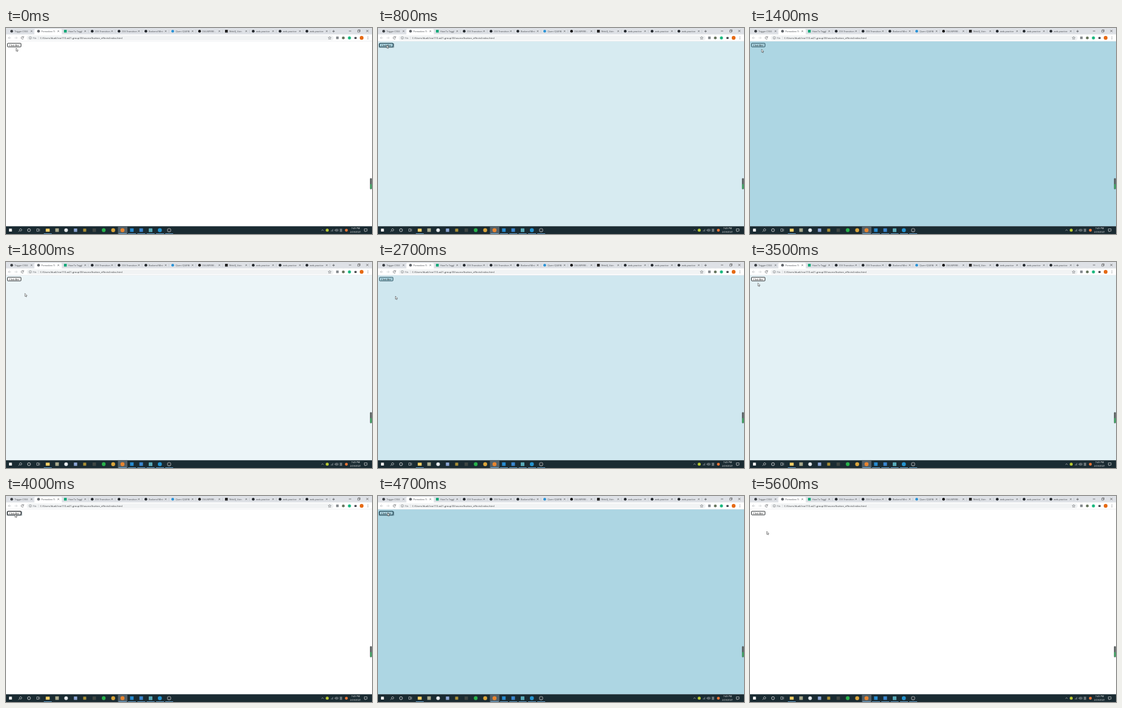
Recreate the animation shown at these times as an HTML page. Size 600x338 px, loop 5800 ms.

```html
<!DOCTYPE html>
<html lang="en">
<head>
<meta charset="utf-8">
<title>Button effects</title>
<style>
html, body { margin: 0; width: 100%; height: 100%; overflow: hidden; background: #fff; }
svg { display: block; width: 600px; height: 338px; }
text { font: 3.75px "Open Sans", "Noto Sans", sans-serif; fill: #45494d; }
</style>
</head>
<body>
<svg id="stage" viewBox="0 0 600 338"></svg>
<script>
const stage = document.getElementById('stage');

function add(tag, attrs, content) {
  const el = document.createElementNS('http://www.w3.org/2000/svg', tag);
  for (const key in attrs) el.setAttribute(key, attrs[key]);
  if (content) el.textContent = content;
  return stage.appendChild(el);
}
const rect = (x, y, width, height, fill, rx = 0) => add('rect', { x, y, width, height, fill, rx });
const dot = (cx, cy, r, fill) => add('circle', { cx, cy, r, fill });
const square = (x, y, size, fill) => rect(x - size / 2, y - size / 2, size, size, fill, 0.5);
const line = (d, stroke, width = 0.7) => add('path', { d, stroke, 'stroke-width': width, fill: 'none' });
const label = (x, y, content, style = '') => add('text', { x, y, style }, content);

const page = rect(0, 22, 600, 303.5, '#fff');

function drawTabs() {
  rect(0, 0, 600, 11, '#dee1e6');
  rect(46.5, 1.5, 45, 10, '#fff', 1.6);
  const tabs = [
    ['Trigger CSS3', '#3c4045'], ['Pomodoro Ti', '#5f6368'], ['How To Toggl', '#16a878'],
    ['CSS Transition', '#24292e'], ['CSS Transition', '#24292e'], ['Backend Mini', '#24292e'],
    ['Quen (QUEN)', '#2b93d6'], ['DULMFERE -', '#111'], ['Web3J, Usin', '#222'],
    ['web-practice', '#24292e'], ['web-practice', '#24292e'], ['web-practice', '#24292e']
  ];
  tabs.forEach(([title, color], i) => {
    const x = 9.3 + i * 44;
    if (i === 2 || i === 8) square(x, 5.3, 4.6, color);
    else dot(x, 5.3, 2.3, color);
    label(x + 4.7, 6.7, title);
    line(`M${x + 31.2} 4l2.6 2.6m0 -2.6l-2.6 2.6`, '#4a4d51', 0.6);
    if (i > 1) line(`M${x + 37.7} 3v5`, '#a7abb0', 0.4);
  });
  line('M535 5.4h4M537 3.4v4', '#45494d');
  line('M562 5h4M590.7 3.2l3.4 3.4m0 -3.4l-3.4 3.4', '#333', 0.6);
  line('M576.6 3.8h3v3h-3zM577.5 3.8v-.9h3v3h-.9', '#333', 0.5);
}

function drawToolbar() {
  rect(0, 10.5, 600, 11.2, '#fff');
  rect(0, 21.5, 600, 0.5, '#dfe1e4');
  rect(34, 12.3, 503, 7.8, '#f1f3f4', 3.9);
  line('M8.2 16.2h-4.4m2 -2l-2 2l2 2', '#b5b8bb');
  line('M14 16.2h4.4m-2 -2l2 2l-2 2', '#c8cacc');
  line('M28.6 15a2 2 0 1 0 .2 2M29 13.7v1.7h-1.8', '#4f5357');
  line('M37.8 16.2a2 2 0 1 0 4 0a2 2 0 1 0 -4 0M39.8 16v1.3', '#55595d', 0.5);
  label(44, 17.7, 'File', 'fill:#5f6368');
  line('M53.2 14v4.4', '#b8bbbf', 0.4);
  label(56, 17.8, 'C:/Users/duoli/cse110-w21-group33/source/button_effects/index.html',
    'font-size:4.15px;fill:#303336');
  line('M530.6 13.9l.7 1.5l1.7.2l-1.2 1.2l.3 1.7l-1.5-.8l-1.5.8l.3-1.7l-1.2-1.2l1.7-.2z', '#4f5357', 0.5);
  square(543.3, 16.2, 4.2, '#858a8e');
  dot(553, 16.2, 2.3, '#65745c');
  dot(563, 16.2, 2.5, '#18b87e');
  square(573, 16.4, 3.4, '#44484c');
  dot(583, 16.2, 3.1, '#e66a14');
  for (const y of [14.3, 16.2, 18.1]) dot(593.2, y, 0.5, '#55595d');
}

function drawTaskbar() {
  rect(0, 325.3, 600, 12.7, '#1a2b32');
  rect(183.5, 325.3, 15.5, 12.7, '#526068');
  square(7.3, 331.7, 4.8, '#f4f4f4');
  line('M20.5 334.3l2 -2a1.8 1.8 0 1 1 .4 .4', '#eee');
  add('circle', { cx: 37.7, cy: 331.7, r: 2.4, fill: 'none', stroke: '#eee', 'stroke-width': 0.8 });
  line('M50.5 329.6h3v4h-3zM55 329.5v4.2', '#ddd', 0.6);
  rect(65.2, 329.2, 6.4, 5, '#f4cf66', 0.4);
  square(83.7, 331.6, 5.8, '#a9a98c');
  dot(98.5, 331.7, 3, '#e5e9ec');
  square(114, 331.7, 5.4, '#8ba4d2');
  square(129, 331.7, 5, '#a98e35');
  square(144.7, 331.7, 5.6, '#3e4643');
  dot(160.2, 331.7, 3.1, '#27b24a');
  dot(175.7, 331.7, 3.2, '#d9a43c');
  dot(191, 331.7, 3.3, '#e8842e');
  square(206.3, 331.7, 5.8, '#268bd1');
  square(221.6, 331.7, 5.8, '#3a86cf');
  square(237, 331.7, 6, '#58a9b8');
  dot(252.2, 331.7, 3.3, '#2493cf');
  dot(267.4, 331.7, 3.2, '#a8adb0');
  dot(267.4, 331.7, 2.4, '#263036');
  for (const x of [62, 184.5, 200, 215.3, 230.6, 246, 261]) rect(x, 337.2, 13, 0.8, '#76b9ed');

  line('M517.2 332.6l1.8 -1.8l1.8 1.8', '#ddd', 0.6);
  dot(526.6, 331.8, 2.5, '#b8c832');
  line('M533 333.8v-1.4m1.4 1.4v-2.6m1.4 2.6v-3.9', '#a8b0b4', 0.6);
  line('M539.2 331h1l1.3 -1.2v4l-1.3 -1.2h-1zM542.8 330.3q1 1.5 0 3M543.7 329.6q1.5 2.2 0 4.4', '#ddd', 0.5);
  line('M547.1 330h4M547.1 333.8h4M548 330v3.8M550.2 330v3.8M547.6 331.9h3.2', '#ddd', 0.5);
  dot(558, 331.8, 2.4, '#ef7435');
  const clock = 'fill:#f2f2f2;text-anchor:middle;font-size:3.8px';
  label(573, 330.4, '7:43 PM', clock);
  label(573, 336.2, '2/23/2021', clock);
  line('M587.4 329.6h4.6v3.6h-1.8l-1.2 1.2v-1.2h-1.6z', '#eee', 0.6);
}

drawTabs();
drawToolbar();
drawTaskbar();
rect(596.7, 246.5, 3, 18, '#555b5b', 1);
rect(597, 256, 2.4, 8, '#38a05c', 0.8);

const shadow = rect(1.2, 25, 25.4, 7.6, '#27444f', 1.5);
shadow.setAttribute('opacity', 0.4);
const button = rect(2.4, 25.1, 22.2, 5.9, '#fff', 0.9);
label(13.5, 29.5, 'Click Me!', 'text-anchor:middle;font-size:4.1px;fill:#111');
const cursor = add('path', {
  d: 'M0 0v5l1.2 -1l.8 1.8l.8 -.4l-.8 -1.7h1.6z',
  fill: '#fff', stroke: '#222', 'stroke-width': 0.5
});

// Each click toggles the blue theme; the page eases over, the button faster.
const clicks = [656, 1580, 2534, 3313, 4150, 4900];
const path = [[0, 16.5, 33], [600, 15, 28], [850, 14, 28], [1150, 29, 52], [1500, 15, 28],
  [1600, 15, 28], [1800, 31, 51.5], [2100, 31, 51.5], [2450, 15, 28], [2550, 15, 28],
  [2700, 28.5, 56], [2900, 28.5, 56], [3250, 14, 28], [3350, 14, 28], [3500, 13, 34.5],
  [3800, 13, 34.5], [4100, 15.5, 27.5], [4950, 15.5, 27.5], [5300, 27.5, 58], [5800, 27.5, 58]];

function cursorAt(t) {
  const i = path.findIndex(key => key[0] > t);
  const [t0, x0, y0] = path[i - 1], [t1, x1, y1] = path[i];
  const p = (t - t0) / (t1 - t0);
  return [x0 + (x1 - x0) * p, y0 + (y1 - y0) * p];
}
function ease(p) {
  const q = 1 - (1 - p) ** 2;
  return q * q * (3 - 2 * q);
}
function theme(t, duration) {
  const count = clicks.filter(c => c <= t).length;
  if (!count) return 0;
  const k = ease(Math.min(1, (t - clicks[count - 1]) / duration));
  return count % 2 ? k : 1 - k;
}
const mix = (from, to, k) => `rgb(${from.map((c, i) => c + (to[i] - c) * k)})`;
const white = [255, 255, 255], blue = [173, 214, 227];

function draw(now) {
  const t = Math.min(Math.floor(now % 5800 / 100) * 100, 5600);
  const [x, y] = cursorAt(t);
  const hover = y < 31;
  const tint = theme(t, 200);
  page.setAttribute('fill', mix(white, blue, theme(t, 500)));
  button.setAttribute('fill', mix(white, blue, tint));
  button.setAttribute('stroke', mix([23, 27, 30], [28, 66, 80], tint));
  button.setAttribute('stroke-width', hover ? 1.2 : 0.9);
  shadow.setAttribute('visibility', hover ? 'visible' : 'hidden');
  cursor.setAttribute('transform', `translate(${x} ${y})`);
}
function tick() {
  draw(performance.now());
  requestAnimationFrame(tick);
}
tick();
</script>
</body>
</html>
```
